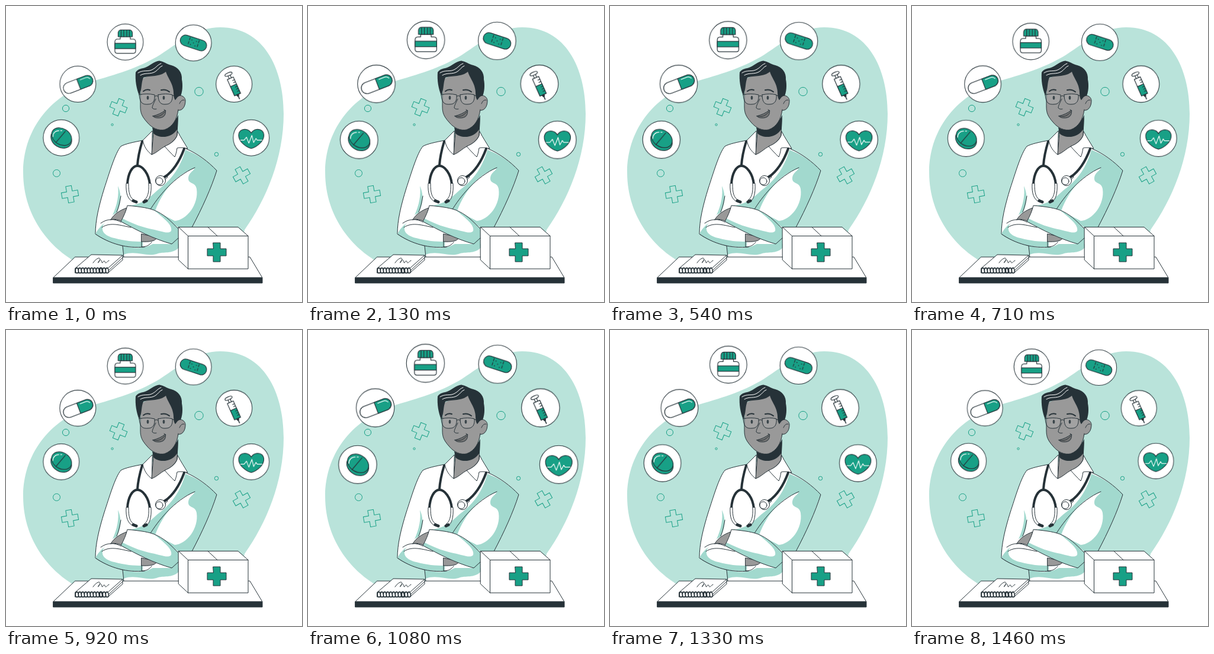
Recreate the animation shown at these times as an HTML page without scripts. Size 500x500 px, loop 1.5 s.

```html
<!DOCTYPE html>
<html lang="en">
<head>
<meta charset="utf-8">
<title>Doctor with pulsing medical icons</title>
<style>
  html, body { margin: 0; width: 100%; height: 100%; overflow: hidden; background: #fff; }
  svg { display: block; width: 100%; height: 100%; }

  .white { fill: #fff; }
  .teal { fill: #18a086; }
  .pale { fill: #b9e3da; }
  .shade { fill: #a2d9ce; }
  .skin { fill: #999; }
  .dark { fill: #263238; }
  .none { fill: none; }
  .line { stroke: #263238; stroke-width: 1; stroke-linecap: round; stroke-linejoin: round; }
  .thin { stroke: #18a086; fill: none; }
  .shine { stroke: #fff; }
  .tube { stroke-width: 4; }

  /* Two beats per loop: quick-slow, then quick-quick, at 24 frames a second */
  .icons {
    transform-origin: 253.7px 141.5px;
    animation: beat 1.5s -5ms infinite;
  }
  .icons .line { stroke-width: 1.15; }
  @keyframes beat {
    0% { transform: scale(1.0016); animation-timing-function: steps(6); }
    16.667% { transform: scale(1.089); animation-timing-function: steps(15); }
    58.333% { transform: scale(.987); animation-timing-function: steps(7); }
    77.778% { transform: scale(1.089); animation-timing-function: steps(7); }
    97.222% { transform: scale(.987); animation-timing-function: steps(1); }
    100% { transform: scale(1.0016); }
  }
</style>
</head>
<body>
<svg viewBox="0 0 500 500">
  <defs>
    <path id="cross" d="M-4.800-14H4.800V-4.800H14V4.800H4.800V14H-4.800V4.800H-14V-4.800H-4.800Z"/>
    <circle id="disc" class="line white" r="30.400"/>
    <path id="ring" class="line none" d="M0 0c-3.500 1-3.500 9 0 9s3-4 1-8" style="stroke-width:1.500"/>
    <g id="rings">
      <use href="#ring"/><use href="#ring" x="5"/><use href="#ring" x="10"/>
    </g>
  </defs>

  <path class="pale" d="M118 432C80 412 29 360 29 281C29 215 68 152 150 126C195 113 229 102 261 82C297 58 324 36 362 36C434 36 469 103 469 182C469 256 440 326 403 378L395 425Z"/>

  <g class="thin">
    <use href="#cross" transform="translate(190 171) rotate(22)"/>
    <use href="#cross" transform="translate(108 318) rotate(-10)"/>
    <use href="#cross" transform="translate(398 286) rotate(-29)"/>
    <circle cx="101" cy="173" r="5.600"/>
    <circle cx="326" cy="144.500" r="7.200"/>
    <circle cx="85.500" cy="282.500" r="6"/>
    <circle cx="355.500" cy="250.500" r="3.200"/>
    <circle cx="179.500" cy="200.500" r="1.700"/>
  </g>

  <g id="coat">
    <path class="white" d="M231 227C215 230 201 233 194 237C184 249 174 284 166 308C157 337 151 362 151 385C166 396 184 401 197 405L199 424H300L314 374C331 342 347 307 356 278C342 263 323 249 304 241L289 212Z"/>
    <path class="shade" d="M189 304C191 319 188 336 180 353L187 349C193 337 197 322 189 304Z"/>
    <path class="shade" d="M303 243C323 250 342 263 356 278C345 310 330 345 314 374H285L205 337C228 337 242 324 255 312C274 298 293 279 303 243Z"/>
    <path class="white" d="M319 274C290 283 266 309 252 346L285 363C305 362 326 335 322 309C320 296 307 302 308 290C309 282 315 280 319 274Z"/>
    <path class="shade" d="M197 404C213 410 232 411 248 402L292 402V408C281 420 266 414 254 419C236 424 219 412 198 420Z"/>
    <path class="line none" d="M231 227C215 230 201 233 194 237C184 249 174 284 166 308C157 337 151 362 151 385C166 396 184 401 197 405L199 424M304 241C323 249 342 263 356 278C347 307 331 342 314 374M243 345C257 322 284 288 319 273M194 321C192 333 190 341 187 348"/>
  </g>

  <g id="arms">
    <path class="white" d="M160 367C170 359 184 359 194 365L231 386V407C205 409 175 402 151 385Z"/>
    <path class="shade" d="M151 385C155 377 160 372 166 367C157 381 169 389 183 392C201 397 215 398 231 398V407C205 409 175 402 151 385Z"/>
    <path class="line none" d="M160 367C170 359 184 359 194 365M162 374C176 364 195 371 211 374M151 385C175 402 205 410 234 407"/>
    <path class="line skin" d="M229 385L256 391C252 396 247 399 229 398Z"/>
    <path class="line none" d="M229 398V407C238 407 243 403 246 399"/>
    <path class="line skin" d="M177 361C182 352 192 345 204 341L199 365C190 361 182 359 177 361Z"/>
    <path class="white" d="M205 337C226 339 243 341 255 347C273 357 281 367 291 374V402L280 402C248 393 222 379 194 364C199 355 203 346 205 337Z"/>
    <path class="shade" d="M250 345C271 354 284 369 291 376V402H280C248 393 222 379 194 364L197 359C216 369 232 374 246 377C262 380 274 386 279 380C282 370 266 358 250 345Z"/>
    <path class="line none" d="M291 376C281 367 273 356 255 347C243 341 226 339 205 337C203 346 199 355 194 364C222 379 248 393 280 402L291 392"/>
  </g>

  <g id="neck">
    <path class="line white" d="M247 211L231 227C233 237 238 245 246 251Z"/>
    <path class="line skin" d="M249 206C249 222 247 235 246 251C257 247 263 238 272 236C280 231 286 225 289 219L290 190Z"/>
    <path class="dark" d="M247 205C259 214 281 207 291 184L290 207C281 223 259 225 249 215Z"/>
    <path class="line white" d="M290 212C295 222 302 232 307 241C299 239 293 239 289 240C288 246 287 251 285 255C279 249 273 243 268 237C278 233 286 227 289 219Z"/>
  </g>

  <g id="stethoscope">
    <path class="line none tube" d="M230 229C226 242 223 254 222 269M301 241C294 260 284 278 268 289"/>
    <path class="line none tube" d="M205 301C206 283 213 270 222 270S241 283 243 301"/>
    <path class="line white" d="M203 300C202 317 206 327 215 331L217 328C209 324 207 316 207 300ZM241 300C242 316 239 324 233 328L236 331C243 327 246 317 245 300Z"/>
    <path class="line none" style="stroke-width:5" d="M215 329L220 331M237 329L233 331"/>
    <circle class="line white" cx="261" cy="295" r="8.500"/>
    <circle class="line white" cx="259" cy="296" r="6"/>
    <path class="line none" d="M266 288L271 285L273 289L269 293"/>
  </g>

  <g id="head">
    <path class="line skin" d="M289 154C294 148 303 153 303 160C303 171 297 178 289 176Z"/>
    <path class="line none" d="M293 165C295 160 298 158 301 159"/>
    <path class="skin" d="M228 124L227 170C227 181 230 187 238 196C247 207 258 211 268 209C282 204 289 191 291 175L288 130L266 106Z"/>
    <path class="line none" d="M227 147V170C227 181 230 187 238 196C247 207 258 211 268 209C282 204 289 191 291 175"/>
    <path class="dark" d="M225 151C220 139 218 125 219 112C223 106 229 106 235 104C243 101 249 94 259 92.500C267 94 271 98 279 100C291 103 298 113 297 124C299 134 298 145 295 152C290 151 289 156 286 159C282 154 284 146 282 139C280 128 273 121 270 111C260 120 244 117 232 121C228 130 230 141 225 151Z"/>
    <path class="line none shine" d="M223 113C232 107 240 112 248 107C254 104 256 99 262 97M227 117C235 112 244 116 252 111C257 108 259 103 264 101"/>
    <path class="line none" style="stroke-width:2" d="M232 144Q237 140 243 142M262 142Q270 140 276 145"/>
    <g class="dark">
      <ellipse cx="239.500" cy="155" rx="1.800" ry="3.200"/>
      <ellipse cx="266.500" cy="155" rx="1.800" ry="3.200"/>
    </g>
    <path class="line none" d="M253 157C250 163 247 169 247 172Q249 175 254 174"/>
    <g class="line" style="fill:#ffffff18">
      <path d="M225 150Q238 147 251 150C252 160 248 166 240 166C230 167 226 163 225 150Z"/>
      <path d="M257 150Q270 147 281 150C282 160 278 166 270 166C261 167 257 162 257 150Z"/>
    </g>
    <path class="line none" d="M251 153Q254 150 257 153M281 151L290 153"/>
    <path class="line" style="fill:#737373" d="M248 186C256 184 263 181 269 176C271 184 266 190 256 189C252 189 250 188 248 186Z"/>
    <path class="line none" d="M267 175L270 177M250 186C257 188 263 185 268 179"/>
  </g>

  <g id="desk">
    <path class="line white" d="M117 424H412L433 459H80Z"/>
    <path class="line dark" d="M80 459H433V468H80Z"/>
    <path class="line white" d="M117 443L144 420L197 421V429L172 451H117Z"/>
    <path class="line none" d="M117 443L172 443L197 421M173 447L197 425"/>
    <path class="line none" d="M147 434C153 425 161 423 158 430C156 435 154 435 157 431S161 429 162 433S165 427 167 432S170 431 174 430"/>
    <use href="#rings" x="120" y="442"/>
    <use href="#rings" x="135" y="442"/>
    <use href="#rings" x="150" y="442"/>
    <use href="#rings" x="161" y="442"/>
    <path class="line white" d="M291.500 373.500H392L409 388.500V444H307.500L291.500 429Z"/>
    <path class="line none" d="M291.500 373.500L307.500 388.500H409M307.500 388.500V444M341 373.500L357 388.500"/>
    <path class="line teal" d="M350 400H362V410H372V422H362V432H350V422H340V410H350Z"/>
  </g>

  <g class="icons">
    <g id="tablet" transform="translate(93.500 222.500)">
      <use href="#disc"/>
      <g transform="rotate(32)">
        <ellipse class="line teal" cx="1" cy="1.500" rx="18.500" ry="14.500"/>
        <ellipse class="line teal" cx="-.5" cy="-2" rx="18" ry="13.500"/>
      </g>
      <path class="line none" d="M-9 8L7-11"/>
      <path class="line none shine" d="M-14-2C-14-8-10-12-4-12M-1-12H1"/>
    </g>

    <g id="bottle" transform="translate(201.500 61)">
      <use href="#disc"/>
      <path class="line white" d="M-8.500-9H8.500V-5H13Q17.500-5 17.500 0V15Q17.500 19 13.500 19H-13.500Q-17.500 19-17.500 15V0Q-17.500-5-13-5H-8.500Z"/>
      <path class="line teal" d="M-17.500 2H17.500V11H-17.500ZM-12-9V-16Q-11-20.500-7-20.500H7Q11-20.500 12-16V-9Z"/>
      <path class="line none" d="M-7-9V-20M-2.500-9V-20M2.500-9V-20M7-9V-20"/>
    </g>

    <g id="bandage" transform="translate(316.500 62.500)">
      <use href="#disc"/>
      <g transform="rotate(18)">
        <rect class="line teal" x="-23" y="-9" width="46" height="18" rx="9"/>
        <path class="line none" stroke-dasharray="4 3" d="M-8-7V7M8-7V7"/>
        <path class="line none" style="stroke-width:1.600" d="M-4-4h0M4-4h0M0 0h0M-4 4h0M4 4h0"/>
      </g>
    </g>

    <g id="capsule" transform="translate(121.500 132)">
      <use href="#disc"/>
      <g transform="translate(.5 .5) rotate(-21)">
        <rect class="line white" x="-26" y="-9.300" width="52" height="18.600" rx="9.300"/>
        <path class="line teal" d="M1-9.300H16.700A9.300 9.300 0 0 1 16.700 9.300H1Z"/>
        <path class="line none shine" d="M6-6H16Q20-6 22-2"/>
      </g>
    </g>

    <g id="syringe" transform="translate(385 132)">
      <use href="#disc"/>
      <g transform="translate(-1 2) rotate(-24)">
        <path class="line none" style="stroke-width:1.500" d="M0 15V25"/>
        <path class="line white" d="M-2-20H2V-12H-2Z"/>
        <ellipse class="line white" cy="-20.500" rx="6.500" ry="2.500"/>
        <path class="line white" d="M-5.500-13H5.500V17H-5.500Z"/>
        <path class="line teal" d="M-5.500 0H5.500V17H-5.500Z"/>
        <path class="line none" d="M5.500-8H2M5.500-4H2M5.500 4H2M5.500 8H2M5.500 12H2"/>
        <path class="line dark" d="M-2 17H2L1 20H-1Z"/>
      </g>
    </g>

    <g id="heart" transform="translate(414 222.500)">
      <use href="#disc"/>
      <path class="line teal" d="M0-8C4-15 13-16 18-12C24-6 21 3 15 9C10 14 5 17 0 18C-5 17-10 14-15 9C-21 3-24-6-18-12C-13-16-4-15 0-8Z"/>
      <path class="line none shine" d="M-18 4H-12L-8-1L-4 9L1-4L4 8L8 1L10 4H18"/>
    </g>
  </g>
</svg>
</body>
</html>
```
